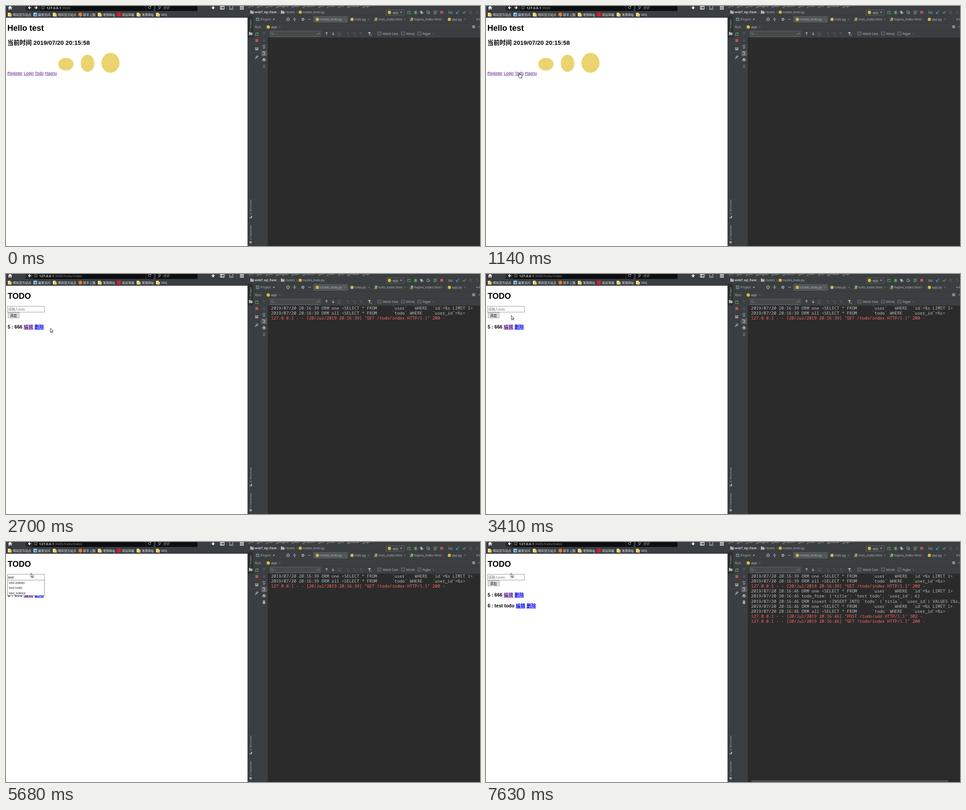
An HTML page that plays this animation: 1052 by 532 pixels, repeating every 8000 ms.

```html
<!DOCTYPE html>
<html lang="zh-CN">
<head>
<meta charset="utf-8">
<title>Todo demo</title>
<style>
html, body { margin: 0; width: 100%; height: 100%; overflow: hidden; background: #fff; }
svg { display: block; width: 1052px; height: 532px; }
text { white-space: pre; }
.ui { font-family: "Open Sans", "Noto Sans CJK SC", "Noto Sans CJK", sans-serif; }
.page { font-family: "Liberation Sans", "Noto Sans CJK SC", "Noto Sans CJK", sans-serif; }
.log { font-family: "Noto Sans Mono", "DejaVu Sans Mono", monospace; font-size: 9.33px; }
.b { font-weight: bold; }
.v { fill: #551a8b; text-decoration: underline; }
.n { fill: #00e; text-decoration: underline; }
</style>
</head>
<body>
<svg id="stage" viewBox="0 0 1052 532" xmlns="http://www.w3.org/2000/svg"></svg>
<script>
const LOOP = 8000;
const GREY = '#afb1b3', DIM = '#5d6062', GREEN = '#5aa560', RED = '#c75450', BLUE = '#3f93c9', PY = '#d6b945';

const rect = (x, y, w, h, fill, more = '') =>
  `<rect x="${x}" y="${y}" width="${w}" height="${h}" fill="${fill}" ${more}/>`;
const box = (x, y, w, h, fill, line, id = '') =>
  rect(x + .5, y + .5, w - 1, h - 1, fill, `stroke="${line}" ${id && `id="${id}"`}`);
const dot = (x, y, r, fill) => `<circle cx="${x}" cy="${y}" r="${r}" fill="${fill}"/>`;
const line = (d, color = GREY, w = 1) =>
  `<path d="${d}" fill="none" stroke="${color}" stroke-width="${w}"/>`;
const shape = (d, fill = GREY) => `<path d="${d}" fill="${fill}"/>`;
const text = (x, y, s, size, fill, cls = 'ui', more = '') =>
  `<text x="${x}" y="${y}" font-size="${size}" fill="${fill}" class="${cls}" ${more}>${s}</text>`;
const group = (id, body) => `<g id="${id}">${body}</g>`;
const esc = s => s.replace(/</g, '&lt;').replace(/>/g, '&gt;');

// Small icons, centred on x, y
const folder = (x, y, c) => shape(`M${x - 4} ${y - 3.5}h3.2l1 1.4h3.8v5.6h-8z`, c);
const gear = (x, y) => line(`M${x - 3.6} ${y}h7.2M${x} ${y - 3.6}v7.2M${x - 2.5} ${y - 2.5}l5 5M${x + 2.5} ${y - 2.5}l-5 5`, GREY, 1.2)
  + `<circle cx="${x}" cy="${y}" r="2" fill="#3c3f41" stroke="${GREY}" stroke-width="1.3"/>`;
const cross = (x, y) => line(`M${x - 1.7} ${y - 1.7}l3.4 3.4m0-3.4l-3.4 3.4`, '#808385', .7);
const down = (x, y) => shape(`M${x - 2.5} ${y - 1.3}h5l-2.5 3z`);
const arrow = (x, y, dir, c) => line(`M${x} ${y - 3.2 * dir}V${y + 3 * dir}m-2.6 ${-2.6 * dir}l2.6 ${2.6 * dir} 2.6 ${-2.6 * dir}`, c, 1.1);
const rerun = (x, y) => line(`M${x + 2} ${y - 2.5}h-4.5v5.5h5.5v-3`, GREEN, 1.2) + shape(`M${x + 1} ${y - 4.5}l3 2-3 2z`, GREEN);
const reload = (x, y) => line(`M${x + 2.6} ${y + .8}a2.8 2.8 0 1 1-.6-2.8m.8-1.5v2h-2`, '#c9cacc', .9);
const chevron = (x, y) => line(`M${x - 1} ${y - 2.5}l2 2.5-2 2.5`, '#85888a', .7);
const vertical = (x, y, s) => text(0, 0, s, 6.1, '#bbb', 'ui', `transform="translate(${x} ${y}) rotate(-90)"`);

function browser() {
  let s = rect(0, 0, 535, 26, '#393e43') + rect(44, 0, 284, 11, '#0d0e10') + rect(332, 0, 93, 11, '#0d0e10');
  s += shape('M4.3 4L9 -.5l4.7 4.5h-1.5v4H10V5H8v3H5.8V4z', '#fff') + rect(310, 0, 1, 11, '#3a3d40');
  s += reload(319, 3.5) + line('M341.5 5l-4 3', '#b4b6b8', 1) + '<circle cx="341" cy="2.7" r="2.2" fill="none" stroke="#b4b6b8"/>';
  s += text(348, 6.6, '搜索', 7.5, '#85878a', 'ui', 'font-style="italic"');
  s += line('M459.7 0v5.5m-3-2.5l3 3 3-3', '#fff', 1.8) + line('M476 .5h8v6.5h-8zM479 .5v6', '#fff', 1.3)
    + line('M496.5 0v7.5h7V0m-5 5h3', '#d7d8d9', 1) + line('M511.5 0v11', '#54585c') + line('M519 1h9M519 4h9M519 7h9', '#fff', 1.4);
  const marks = ['晴岚官方站点', '最常访问', '晴岚官方站点', '新手上路', '常用网址', '岚谷商城', '常用网址', 'VXQ'];
  [4, 60, 104, 160, 204, 246, 290, 333].forEach((x, i) => {
    if (i == 1) s += rect(x + 1, 15, 8, 8, '#b9dcf3') + rect(x + 3, 17, 5, 5, '#338dc9');
    else if (i == 3) s += dot(x + 5, 19, 4.4, '#e87a24');
    else if (i == 5) s += rect(x, 14.5, 9, 9, '#d71f26');
    else s += rect(x, 15, 6, 8, '#f9e6a0') + rect(x + 3, 17, 5.5, 6.5, '#edc75c');
    s += text(x + 11.3, 21.7, marks[i], 6.8, '#f4f4f4');
  });
  const forward = line('M63 3.7h6m-3-3l3 3-3 3', '#fff', 1.6);
  return s + group('homeUrl', url(73, '') + forward) + group('todoUrl', url(57, '/todo/index'));
}

function url(x, path) {
  return rect(44, 0, x + 3 - 44, 11, '#232629') + line('M56 3.7h-6m3-3l-3 3 3 3', '#fff', 1.6)
    + `<circle cx="${x + 9}" cy="3.7" r="3.6" fill="none" stroke="#aaa" stroke-width=".8"/>`
    + line(`M${x + 9} 3v3M${x + 9} 1.5v.8`, '#bbb', .9)
    + text(x + 16.5, 6.6, `<tspan fill="#fff" font-weight="600">127.0.0.1</tspan>:3000${path}`, 7.8, '#8d8f92');
}

function home() {
  let s = text(3, 54.5, 'Hello test', 18, '#000', 'page b') + text(3, 86, '当前时间 2019/07/20 20:15:58', 13.5, '#000', 'page b');
  s += text(3, 152, ['Register', 'Login', 'Todo', 'Hapnu'].map(w => `<tspan class="v">${w}</tspan>`).join(' '), 9.1, '#000', 'page');
  return s + [[133, 129, 17, 14], [181, 127, 15, 19], [232, 126, 20, 22]].map(([x, y, rx, ry]) =>
    `<ellipse cx="${x}" cy="${y}" rx="${rx}" ry="${ry}" fill="#ebd36f"/>`).join('');
}

const item = (y, label, cls) =>
  text(3.7, y, `${label} <tspan class="${cls}">编辑</tspan> <tspan class="n">删除</tspan>`, 10.5, '#000', 'page b');

function todo() {
  return text(3.7, 54.5, 'TODO', 18, '#000', 'page b')
    + box(3, 71, 83, 14, '#fff', '#999', 'field') + '<text id="value" x="5" y="81" font-size="7.5" class="page"></text>'
    + box(4, 85, 26, 13, '#e1e1e1', '#adadad') + text(9, 94.5, '添加', 7.5, '#000', 'page')
    + item(121, '5 : 666', 'v') + group('added', item(145, '6 : test todo', 'n'))
    + group('popup', box(3, 84, 83, 35, '#fff', '#8c8c8c', 'list')
      + text(6.7, 93, 'test edited', 7, '#111', 'ui', 'id="row0"')
      + group('rows', text(6.7, 104.2, 'test todo', 7, '#111') + text(6.7, 115.5, 'test_edited', 7, '#111')))
    + group('caret', rect(0, 73, 1, 10, '#000'));
}

function ide() {
  let s = rect(535, 0, 517, 532, '#3c3f41') + rect(535, 26, 1, 506, '#fff') + rect(536, 22, 12, 48, '#2d2f30');
  s += line('M536 21.5h516M548 38.5h504M548 54.5h504M548.5 22v510', '#36393b');
  s += rect(581, 70, 471, 462, '#2b2b2b');
  const menu = ['File', 'Edit', 'View', 'Navigate', 'Code', 'Refactor', 'Run', 'Tools', 'VCS', 'Window', 'Help'];
  [539, 557, 577, 599, 634, 658, 693, 712, 737, 757, 791].forEach((x, i) => {
    s += text(x, 2.3, `<tspan text-decoration="underline">${menu[i][0]}</tspan>${menu[i].slice(1)}`, 7, '#bbb');
  });

  // Breadcrumb and run bar
  s += folder(546, 13.5, GREY) + text(552, 16.3, 'web7_sql_flask', 6.7, '#ccc', 'ui b') + chevron(606, 14)
    + folder(614, 13.5, GREY) + text(620, 16.3, 'routes', 7, '#bbb') + chevron(646, 14)
    + dot(653, 13.8, 3.5, PY) + text(658, 16.3, 'routes_todo.py', 7, '#bbb');
  s += box(843, 8, 41, 13, '#3c3f41', '#5f6365') + dot(851, 14.3, 3.7, PY) + text(858, 17, 'app', 7.2, '#ccc') + down(877, 14);
  s += rerun(894, 14.5) + line('M905.5 11l7 6m0-6l-7 6M905 14h8', GREEN, .8) + `<ellipse cx="909" cy="14.5" rx="2.4" ry="3.5" fill="${GREEN}"/>`;
  s += shape('M919 11h5v7q-5-1-5-7z') + shape('M923.5 13l4 2.5-4 2.5z', GREEN)
    + '<circle cx="937" cy="14" r="3" fill="none" stroke="#afb1b3"/>' + shape('M937.5 13.5l4 2.3-4 2.3z', GREEN)
    + line('M949 11.5h7M949 14.5h4M949 17.5h4', GREY) + shape('M953.5 13.5l3.5 2-3.5 2z', GREEN);
  s += rect(964, 11, 6, 6, RED) + text(981.5, 16.5, 'Git:', 7, '#bbb')
    + line('M1005.5 10.8l-6 6m0-4v4h4', BLUE, 1.3) + line('M1013.5 14l2.5 2.5 4.5-5', GREEN, 1.5)
    + `<circle cx="1031" cy="14" r="3.3" fill="none" stroke="${DIM}"/>` + line('M1031 12v2.3h2', DIM)
    + line('M1044 17h3.5q2.5-4-3-4.5m1.5-2l-2 2 2 2', DIM);

  // Project header and editor tabs
  s += box(555, 26, 7, 7, '#42606d', '#78a2b5') + text(565, 32.2, 'Project', 7, '#bbb') + down(594.5, 29.7);
  s += '<circle cx="626" cy="29.5" r="3.3" fill="none" stroke="#afb1b3"/>' + line('M626 25.5v3M626 30.5v3M622 29.5h3M627 29.5h3')
    + line('M637 29.5h7M640.5 25v3m-1.5-1.2l1.5 1.5 1.5-1.5M640.5 34v-3m-1.5 1.2l1.5-1.5 1.5 1.5', GREY, .9)
    + gear(659, 29.5) + line('M670.5 29.5h6');
  s += rect(682, 22, 77, 15, '#515658');
  [[691, 'routes_todo.py', 753], [768, 'todo.py', 805], [821, 'todo_index.html', 885],
   [900.5, 'hapnu_index.html', 968], [984, 'app.py', 1018.5]].forEach(([x, name, end]) => {
    s += name.endsWith('py') ? dot(x, 29.7, 3.6, PY)
      : shape(`M${x - 2} 26h5v4h-5z`, '#9aa7b0') + rect(x - 4, 30, 7, 3.5, '#5b9a47');
    s += text(x + 5.7, 32, name, 7, '#bbb') + cross(end, 29.5);
  });
  s += line('M1044 29.5h3m-1.5-1.5v3M1048.5 28h3M1048.5 30.5h3');

  // Run panel
  s += text(552.5, 48.8, 'Run:', 7, '#bbb') + dot(582, 46.5, 3.7, PY) + text(588.5, 48.8, 'app', 7.2, '#ccc')
    + cross(607.5, 46.5) + gear(1038, 46) + line('M1048.5 46h4');
  s += rerun(556.5, 62.5) + rect(553.5, 73.5, 6, 6, RED) + shape('M553 92h3.2v2.6H553zm4 0h3v2.6h-3zm-4 3.5h7V98h-7z')
    + line('M553 117l3-3.5m-1.5-2.5l4 4m-1.5-5.5l3 3', GREY, 1.6);
  s += arrow(572.5, 61, -1, DIM) + arrow(572.5, 76, 1, DIM) + line('M569 87.5h7M569 90.5h5.5q2 1.5 0 3H571m1.3-1.3l-1.3 1.3 1.3 1.3');
  s += rect(566.5, 98.5, 12.5, 12.5, '#595d5f') + line('M569 101.5h4M569 108h7M573.5 101v4.5m-2-2l2 2 2-2', '#c4c6c8');
  s += shape('M570.5 115.5h4v2h-4zm-1.7 2.5h7.6v3.5h-1.4v-1.2h-5v1.2h-1.2zm2.2 3h3.4v2H571z');
  s += `<path id="trash" d="M569.5 130.2h6.2v1h-6.2zm2-1h2.2v1h-2.2zm-1.4 2.6h5v5.4h-5z"/>`;
  s += box(586, 55, 112, 13, '#45494a', '#646769') + '<circle cx="591" cy="61" r="2.3" fill="none" stroke="#8b8e90" stroke-width=".8"/>'
    + line('M592.7 62.8l1.6 1.7M595.5 61l1 1 1-1M695 58.5v3.5h-6m1.6-1.5l-1.6 1.5 1.6 1.5', '#8b8e90', .8);
  s += arrow(711.5, 61, -1, GREY) + arrow(726, 61, 1, GREY) + line('M737 58h6v7h-6zM738.5 62h3', DIM);
  [759, 773.5, 788].forEach(x => { s += line(`M${x - 4} 60h6m-3-2.5v5M${x - 1} 64.5h5`, DIM, .9); });
  s += shape('M803 58h7.5l-3 3.5v4l-1.5-1v-3zM808.5 64h3l-1.5 2z');
  [[824.5, 'Match Case', 836], [877, 'Words', 888], [913.5, 'Regex', 924.7]].forEach(([x, name, tx]) => {
    s += box(x, 57, 8, 8, '#43494a', '#707375') + text(tx, 63.7, name, 6.4, '#bbb');
  });
  s += text(947.5, 63.5, '?', 6, '#8ba8c0');

  // Side strip
  s += vertical(545.3, 56, '1: Project') + folder(543, 61, GREY) + vertical(545.3, 462, 'Z: Structure')
    + shape('M540.5 468h2.4v2.4h-2.4zm3-3h2.4v5.4h-2.4z') + vertical(545.3, 518, '2: Favorites')
    + shape('M543 519.5l1 2.7 2.8.1-2.2 1.8.8 2.8-2.4-1.6-2.4 1.6.8-2.8-2.2-1.8 2.8-.1z');
  return s;
}

function logs() {
  const user = 'ORM one <SELECT * FROM      `user`   WHERE  `id`=%s LIMIT 1>';
  const all = 'ORM all <SELECT * FROM      `todo` WHERE    `user_id`=%s>';
  const sql = (sec, s) => [`2019/07/20 20:16:${sec} ${s}`, '#bbb'];
  const http = (sec, s) => [`127.0.0.1 - - [20/Jul/2019 20:16:${sec}] "${s} -`, '#ff6b68'];
  const rows = [
    sql(39, user), sql(39, all), http(39, 'GET /todo/index HTTP/1.1" 200'),
    sql(46, user), sql(46, "todo_form: {'title': 'test todo', 'user_id': 6}"),
    sql(46, 'ORM insert <INSERT INTO `todo` (`title`, `user_id`) VALUES (%s, %s)>'),
    sql(46, user), sql(46, all), http(46, 'POST /todo/add HTTP/1.1" 302'), http(46, 'GET /todo/index HTTP/1.1" 200')
  ].map(([s, c], i) => `<text class="log" x="588.3" y="${78.7 + i * 11.17}" fill="${c}">${esc(s)}</text>`);
  return group('log1', rows.slice(0, 3).join('')) + group('log2', rows.slice(3).join('') + rect(589, 528, 437, 4, '#4d4e4f'));
}

const pointers = group('arrow', '<path d="M.5.5v9l2.1-1.9 1.5 3.1 1.4-.7-1.5-3 2.8-.2z" fill="#fff" stroke="#000" stroke-width=".8"/>')
  + group('hand', '<path d="M-.8 7V1q.9-1.4 1.8 0v3.2l4 .9q1 .4 .8 1.8l-.6 4.6h-5l-3-4q.3-1.5 2-.5z" fill="#fff" stroke="#000" stroke-width=".8"/>')
  + group('beam', line('M-1.5-4.5H1.5M0-4.5v9M-1.5 4.5h3', '#000', .9));

const stage = document.getElementById('stage');
stage.innerHTML = rect(0, 0, 535, 532, '#fff') + group('home', home()) + group('todo', todo())
  + browser() + ide() + logs() + group('pointer', pointers);
const el = id => document.getElementById(id);
const show = (id, on) => { el(id).style.display = on ? '' : 'none'; };

// Pointer path: time, x, y
const path = [
  [40, 988, 518], [300, 640, 300], [520, 250, 152], [680, 95, 121], [840, 70, 147], [900, 74, 148],
  [1960, 74, 148], [2220, 197, 139], [2490, 197, 139], [2700, 98, 120], [2900, 88, 112], [3290, 62, 79],
  [3320, 62, 79], [3560, 45, 112], [3700, 50, 104], [4040, 44, 77], [5520, 44, 77], [5680, 55, 69], [LOOP, 55, 69]
];
const typing = [[5160, 't'], [5200, 'te'], [5250, 'tes'], [5290, 'test'], [6690, 'test '], [6760, 'test t'],
  [6820, 'test to'], [7110, 'test tod'], [7230, 'test todo'], [7490, '']];

function pointerAt(t) {
  const i = Math.max(1, path.findIndex(k => k[0] > t));
  const [t0, x0, y0] = path[i - 1], [t1, x1, y1] = path[i];
  const u = Math.min(1, Math.max(0, (t - t0) / (t1 - t0)));
  return [x0 + (x1 - x0) * u, y0 + (y1 - y0) * u];
}

function draw(t) {
  const onTodo = t >= 1400, between = (a, b) => t >= a && t < b;
  show('home', !onTodo);
  show('homeUrl', !onTodo);
  show('todo', onTodo);
  show('todoUrl', onTodo);
  show('log1', onTodo);
  show('added', t >= 7490);
  show('log2', t >= 7630);
  el('trash').setAttribute('fill', t >= 4580 ? GREY : DIM);

  const [x, y] = pointerAt(t);
  const inField = onTodo && x > 3 && x < 86 && y > 71 && y < 85;
  const onLink = onTodo ? x > 39 && x < 84 && y > 110 && y < 123 : x > 63 && x < 84 && y > 143 && y < 154;
  el('pointer').setAttribute('transform', `translate(${x.toFixed(1)} ${y.toFixed(1)})`);
  show('pointer', t >= 40 && !between(5160, 5520));
  show('beam', inField);
  show('hand', onLink);
  show('arrow', !inField && !onLink);
  el('field').setAttribute('stroke', inField ? '#222' : '#999');

  const typed = typing.reduce((last, [at, s]) => t >= at ? s : last, '');
  const value = el('value');
  value.textContent = typed || '请输入todo';
  value.setAttribute('fill', typed ? '#000' : '#757575');

  const short = t >= 7000;
  show('popup', between(5160, 7230));
  show('rows', !short);
  el('list').setAttribute('height', short ? 12 : 34);
  el('row0').textContent = short ? 'test todo' : 'test edited';
  const caret = between(4160, 4580) || between(5160, 5680) || between(6050, 6180) || between(6690, 7400);
  show('caret', caret);
  if (caret) el('caret').setAttribute('transform', `translate(${typed ? 5.5 + value.getComputedTextLength() : 5} 0)`);
}

const start = performance.now();
function tick() {
  draw((performance.now() - start) % LOOP);
  requestAnimationFrame(tick);
}
draw(0);
requestAnimationFrame(tick);
</script>
</body>
</html>
```
